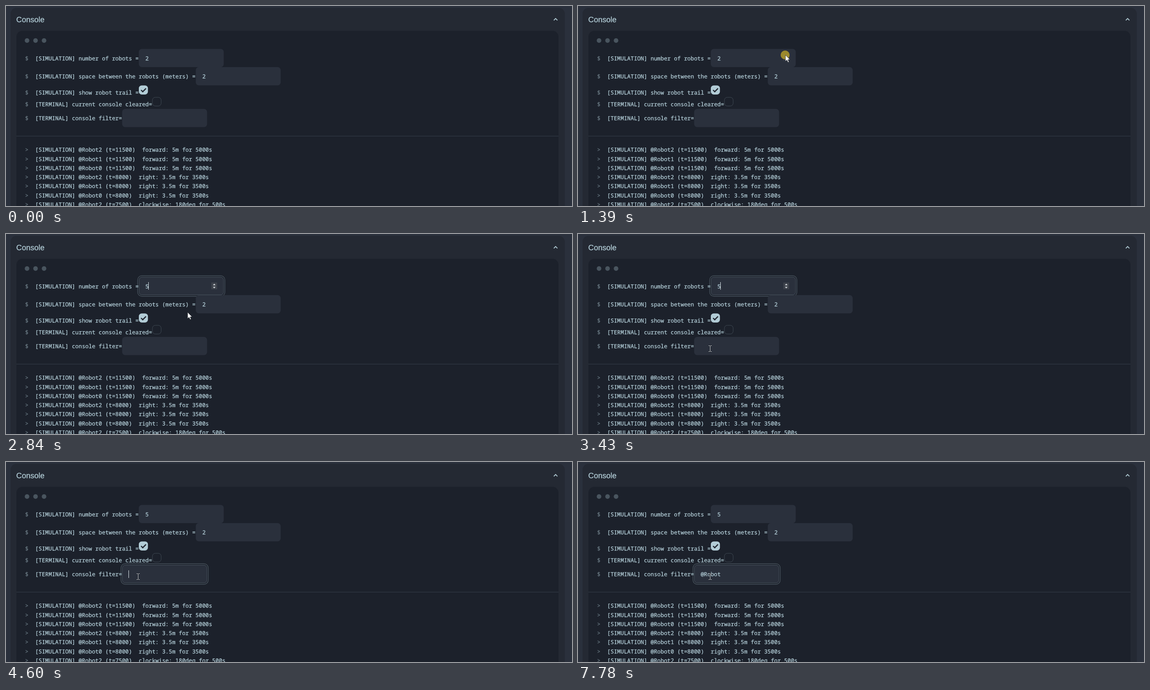
An HTML page for the animation above (8 s loop, 1257 by 445 pixels).

```html
<!DOCTYPE html>
<html lang="en">
<head>
<meta charset="utf-8">
<title>Console</title>
<style>
  html, body { margin: 0; height: 100%; overflow: hidden; background: #2a303c; }
  svg { display: block; width: 100vw; height: 100vh; }
  text { font: 12.375px "Noto Sans Mono", monospace; fill: #b6d1db; stroke: #b6d1db; stroke-width: .25; white-space: pre; text-rendering: geometricPrecision; }
  .title { font: 17.1px "Liberation Sans", Arial, sans-serif; }
  .dim { opacity: .5; }
  .field { fill: #2a303c; }
  .ring { fill: none; stroke: #b2ccd6; stroke-opacity: .22; }
  .outline { stroke-opacity: .32; stroke-width: 1.2; }
  .caret { fill: #dbe6ea; }
</style>
</head>
<body>
<svg id="stage" viewBox="0 0 1257 445">
  <rect x="10" y="4" width="1231" height="470" rx="13.5" fill="#242933"/>
  <rect x="23" y="55" width="1204" height="420" rx="13.5" fill="#1c212b"/>
  <text class="title" x="22.8" y="35.5">Console</text>
  <path d="M1216.6 31.8l4-4 4 4" fill="none" stroke="#b2ccd6" stroke-width="1.8"/>
  <g fill="#b2ccd6" opacity=".3">
    <circle cx="46.7" cy="76.8" r="5.1"/><circle cx="65.6" cy="76.8" r="5.1"/><circle cx="84.5" cy="76.8" r="5.1"/>
  </g>
  <rect x="23" y="289" width="1204" height="1" fill="#353d48"/>
  <g id="lines"></g>
  <rect x="295" y="176.7" width="20.2" height="20.2" rx="6.5" fill="#b2ccd6"/>
  <path d="M300 187l3.7 3.7 7.2-7.4" fill="none" stroke="#1c212b" stroke-width="2.4"/>
  <rect class="ring" x="325.2" y="203.2" width="19.3" height="19.3" rx="6.2"/>
  <g id="fields"></g>
  <circle id="click" r="10" fill="#c8ac28" opacity=".72"/>
  <path id="arrow" d="M0 0V14.3L3.3 11.2 5.7 16.4 7.9 15.4 5.6 10.3H10Z" fill="#fff" stroke="#14181f" stroke-width=".7"/>
  <g id="beam" fill="none">
    <path d="M-3.5-6.5h7M0-6.5v13M-3.5 6.5h7" stroke="#10141b" stroke-width="2"/>
    <path d="M-3.5-6.5h3M.5-6.5h3M0-6v12M-3.5 6.5h3M.5 6.5h3" stroke="#d5d8dc"/>
  </g>
</svg>
<script>
const LOOP = 8000, CHAR = 7.425;
const $ = id => document.getElementById(id);

const prompts = [
  [121, '[SIMULATION] number of robots ='],
  [161, '[SIMULATION] space between the robots (meters) ='],
  [197, '[SIMULATION] show robot trail ='],
  [223, '[TERMINAL] current console cleared='],
  [254, '[TERMINAL] console filter=']
];
const moves = [
  ['(t=11500)  forward: 5m for 5000s', 3],
  ['(t=8000)  right: 3.5m for 3500s', 3],
  ['(t=7500)  clockwise: 180deg for 500s', 1]
];

const line = (y, mark, s) =>
  `<text class="dim" x="42.6" y="${y}">${mark}</text><text x="64.85" y="${y}">${s}</text>`;

let html = prompts.map(([y, s]) => line(y, '$', s)).join(''), row = 0;
for (const [what, count] of moves)
  for (let i = 0; i < count; i++)
    html += line(Math.round(324.3 + 20.25 * row++), '&gt;', `[SIMULATION] @Robot${2 - i} ${what}`);
$('lines').innerHTML = html;

const boxes = [
  { x: 295, y: 95.5, number: true },
  { x: 421.5, y: 136, number: true },
  { x: 258, y: 229 }
];
const W = 188.5, H = 40.5;

// Last value whose start time has been reached
const at = (steps, t) => steps.reduce((v, [start, next]) => t >= start ? next : v, steps[0][1]);
const within = (t, spans) => spans.some(([a, b]) => t >= a && t < b);

const robots = [[0, '2'], [1420, '3'], [1860, '4'], [2420, '5']];
const filter = [[0, ''], [5450, '@'], [6010, '@R'], [6610, '@Ro'], [6860, '@Rob'], [7120, '@Robo'], [7250, '@Robot']];
const caretOff = [[2950, 3430], [4090, 4600], [5140, 5450], [5980, 6010], [6540, 6610], [7780, LOOP]];
const clicks = [[1390, 1530], [1860, 1980], [2390, 2570], [3530, 3680]];
const path = [
  [240, 679, 13], [380, 586, 75], [520, 516.5, 107], [640, 476, 109], [760, 457, 109],
  [960, 457, 109], [1180, 460.7, 109], [2780, 460.7, 109], [2870, 376, 205],
  [2960, 281, 305], [3120, 281, 305], [3270, 290, 268], [3430, 293.5, 255], [LOOP, 293.5, 255]
];

function pointer(t) {
  const i = path.findIndex(p => p[0] > t);
  if (i === 0) return null;
  const [t0, x0, y0] = path[i - 1], [t1, x1, y1] = path[i], k = (t - t0) / (t1 - t0);
  return { x: x0 + (x1 - x0) * k, y: y0 + (y1 - y0) * k };
}

const inside = (p, b) => p && p.x >= b.x && p.x < b.x + W && p.y >= b.y && p.y < b.y + H;
const onSpinner = (p, b) => b.number && p.x > b.x + 162.5 && p.x < b.x + 175;

function ring(b, grow, cls) {
  return `<rect class="${cls}" x="${b.x - grow}" y="${b.y - grow}" width="${W + 2 * grow}" height="${H + 2 * grow}" rx="${6.5 + grow}"/>`;
}

function field(b, value, focus, hover, hot, caret) {
  const { x, y } = b, mid = Math.round(y + 20.5);
  let s = ring(b, 0, 'field');
  if (focus) s += ring(b, -.5, 'ring') + ring(b, 2.6, 'ring outline');
  if (b.number && (focus || hover)) {
    const sx = x + 161, c = sx + 6.5;
    s += `<g opacity="${focus ? 1 : .35}"><rect x="${sx}" y="${mid - 8}" width="13" height="15" fill="#3d424b"/>` +
      (hot ? `<rect x="${sx}" y="${mid - 8}" width="13" height="7.5" fill="#535963"/>` : '') +
      `<path d="M${c - 3} ${mid - 2}l3-3.5 3 3.5zM${c - 3} ${mid + 1.5}l3 3.5 3-3.5z" fill="#d0d4d8"/></g>`;
  }
  s += `<text x="${x + 14.4}" y="${Math.floor(y + 25.5)}">${value}</text>`;
  if (focus && caret)
    s += `<rect class="caret" x="${Math.floor(x + 14.4 + value.length * CHAR)}" y="${mid - 9}" width="1" height="17"/>`;
  return s;
}

function place(id, p, show) {
  $(id).style.display = show ? '' : 'none';
  if (show) $(id).setAttribute('transform', `translate(${p.x} ${p.y})`);
}

function draw(t) {
  const p = pointer(t);
  const focus = t < 1420 ? -1 : t < 3530 ? 0 : 2;
  const values = [at(robots, t), '2', at(filter, t)];
  const caret = !within(t, caretOff);
  $('fields').innerHTML = boxes.map((b, i) => {
    const hover = inside(p, b);
    return field(b, values[i], focus === i, hover, hover && onSpinner(p, b), caret);
  }).join('');
  const typing = boxes.some(b => inside(p, b) && !onSpinner(p, b));
  place('arrow', p, p && !typing);
  place('beam', p, p && typing);
  place('click', p && { x: p.x - (typing ? 2 : .7), y: p.y - (typing ? 1 : 0) }, within(t, clicks));
}

const start = performance.now();
function tick() {
  draw((performance.now() - start) % LOOP);
  requestAnimationFrame(tick);
}
tick();
</script>
</body>
</html>
```
